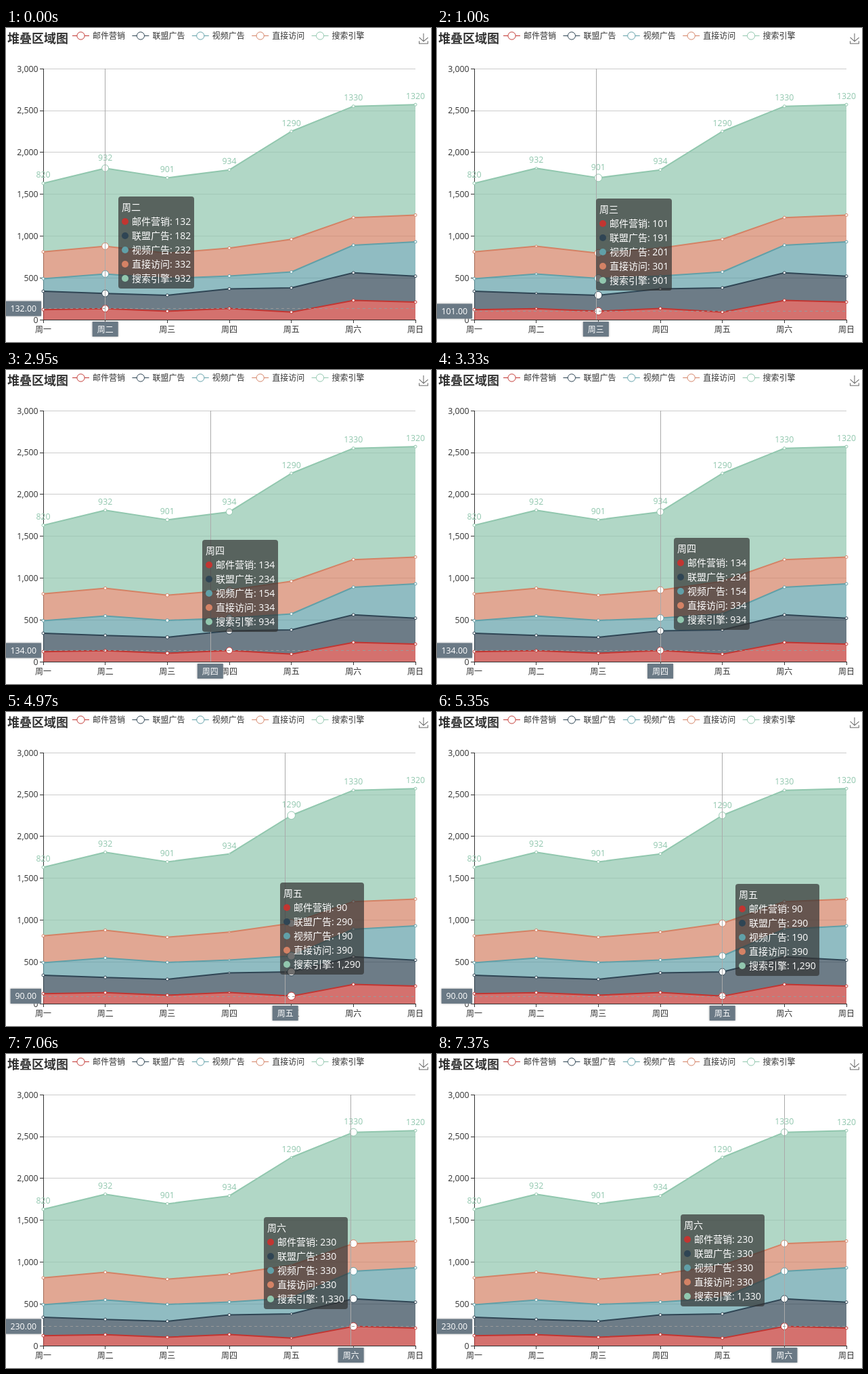
An HTML page that plays this animation: 628x464 px, repeating every 8000 ms.

```html
<!DOCTYPE html>
<html lang="zh-CN">
<head>
<meta charset="utf-8">
<title>堆叠区域图</title>
<style>
  html, body { margin: 0; width: 100%; height: 100%; overflow: hidden; background: #fff; }
  svg { display: block; width: 628px; height: 464px; }
  text { font: 12.3px 'Open Sans', 'Noto Sans CJK SC', 'Noto Sans CJK', sans-serif; fill: #333; white-space: pre; }
  .cjk { font-size: 12px; }
  .title { font-size: 18px; font-weight: bold; }
  .tip text { font-size: 14px; fill: #fff; }
  .tag text { fill: #fff; }
  .tag rect { fill: #6a7985; filter: drop-shadow(0 0 1.5px #aaa); }
</style>
</head>
<body>
<svg id="stage" viewBox="0 0 628 464"></svg>
<script>
const LOOP = 8000;
const LEFT = 55, RIGHT = 605, TOP = 60, BASE = 431;
const days = [...'一二三四五六日'].map(d => '周' + d);
const series = [
  ['邮件营销', '#c23531', [120, 132, 101, 134, 90, 230, 210]],
  ['联盟广告', '#2f4554', [220, 182, 191, 234, 290, 330, 310]],
  ['视频广告', '#61a0a8', [150, 232, 201, 154, 190, 330, 410]],
  ['直接访问', '#d48265', [320, 332, 301, 334, 390, 330, 320]],
  ['搜索引擎', '#91c7ae', [820, 932, 901, 934, 1290, 1330, 1320]]
].map(([name, color, data]) => ({ name, color, data }));

// Hovered day, tooltip corner, first and last redraw, redraw count, time already run
const stops = [
  { day: 1, x: 166, y: 249, from: -500, to: -30, steps: 7, lead: 16 },
  { day: 2, x: 258, y: 253, from: 920, to: 1390, steps: 7, lead: 16 },
  { day: 3, x: 350, y: 248, from: 2950, to: 3330, steps: 6, lead: 34 },
  { day: 4, x: 441, y: 254, from: 4970, to: 5350, steps: 6, lead: 67 },
  { day: 5, x: 360, y: 237, from: 6910, to: 7370, steps: 7, lead: 16 }
];

const stage = document.getElementById('stage');
const px = i => LEFT + (RIGHT - LEFT) * i / 6;
const py = v => BASE - (BASE - TOP) * v / 3000;
const snap = v => (Math.round(v * 2) | 1) / 2;
const mix = (a, b, t) => a + (b - a) * t;
const comma = n => n.toLocaleString('en-US');

function set(el, attrs) {
  for (const k in attrs) el.setAttribute(k, attrs[k]);
  return el;
}
function add(tag, attrs, parent = stage) {
  return parent.appendChild(set(document.createElementNS('http://www.w3.org/2000/svg', tag), attrs));
}
function line(x1, y1, x2, y2, stroke, more) {
  return add('line', { x1, y1, x2, y2, stroke, ...more });
}
function text(str, x, y, more, parent) {
  const el = add('text', { x, y, ...more }, parent);
  el.textContent = str;
  return el;
}

// Header
text('堆叠区域图', 2, 21.5, { class: 'title' });
series.forEach(({ name, color }, i) => {
  const x = 98 + 88.4 * i;
  line(x, 11.5, x + 25, 11.5, color);
  add('circle', { cx: x + 12.5, cy: 11.5, r: 5.6, fill: '#fff', stroke: color });
  text(name, x + 30, 16.3, { class: 'cjk' });
});
add('path', {
  d: 'M4.7 22.9 29.3 45.5 54.7 23.4M4.6 43.6V58H53.8V43.6M29.2 45.1V0',
  transform: 'translate(609.4 8) scale(.2586)', fill: 'none', stroke: '#666', 'stroke-width': 3.87
});

// Axes
for (let v = 0; v <= 3000; v += 500) {
  const y = snap(py(v));
  line(LEFT, y, RIGHT, y, '#ccc');
  line(LEFT - 5, y, LEFT, y, '#333');
  text(comma(v), 47.5, py(v) + 4.6, { 'text-anchor': 'end' });
}
line(LEFT + .5, TOP, LEFT + .5, BASE + 1, '#333');
line(LEFT, BASE + .5, RIGHT + 1, BASE + .5, '#333');
days.forEach((d, i) => {
  const x = snap(px(i));
  line(x, BASE, x, BASE + 5, '#333');
  text(d, px(i), 449.7, { 'text-anchor': 'middle', class: 'cjk' });
});

// Stacked series
let floor = days.map(() => 0);
for (const s of series) {
  s.low = floor;
  s.sum = floor = s.data.map((v, i) => v + s.low[i]);
}
const points = row => row.map((v, i) => [px(i), py(v)]);
for (const s of series)
  add('polygon', { points: [...points(s.sum), ...points(s.low).reverse()].join(' '), fill: s.color, 'fill-opacity': .7 });
for (const s of series)
  add('polyline', { points: points(s.sum).join(' '), fill: 'none', stroke: s.color, 'stroke-width': 2, 'stroke-linejoin': 'bevel' });
for (const s of series)
  s.dots = points(s.sum).map(([cx, cy]) => add('circle', { cx, cy, r: 2, fill: '#fff', stroke: s.color }));
const top5 = series[4];
const values = top5.data.map((v, i) =>
  text(v, px(i), 0, { 'text-anchor': 'middle', style: 'fill:' + top5.color }));

// Pointer
const cross = line(LEFT, 0, RIGHT, 0, '#999', { 'stroke-dasharray': '4 4' });
const rule = line(0, TOP, 0, BASE, '#aaa');
const xTag = add('g', { class: 'tag' });
add('rect', { x: -19, y: 434, width: 38, height: 22 }, xTag);
const xText = text('', 0, 449.7, { 'text-anchor': 'middle', class: 'cjk' }, xTag);
const yTag = add('g', { class: 'tag' });
const yBox = add('rect', { y: -11, height: 22 }, yTag);
const yText = text('', 45, 4.5, { 'text-anchor': 'end' }, yTag);

// Tooltip
const tip = add('g', { class: 'tip' });
const tipBox = add('rect', { height: 136, rx: 4, fill: '#323232', 'fill-opacity': .7 }, tip);
const tipHead = text('', 5, 20.7, {}, tip);
const tipRows = series.map((s, i) => {
  add('circle', { cx: 10, cy: 37 + 21 * i, r: 5, fill: s.color }, tip);
  return text('', 20, 41.7 + 21 * i, {}, tip);
});

const clamp = t => Math.min(1, Math.max(0, t));
const expoOut = t => t >= 1 ? 1 : 1 - 2 ** (-10 * t);
const elasticOut = t => t <= 0 ? 0 : t >= 1 ? 1 : 1 + 2 ** (-10 * t) * Math.sin((t - .1) * Math.PI * 5);
// cubic-bezier(.23, 1, .32, 1)
function quintOut(t) {
  if (t >= 1) return 1;
  let lo = 0, hi = 1;
  for (let i = 0; i < 24; i++) {
    const s = (lo + hi) / 2, r = 1 - s;
    if (.69 * s * r * r + .96 * s * s * r + s ** 3 < t) lo = s; else hi = s;
  }
  return 3 * lo * (1 - lo) + lo ** 3;
}

function draw(time) {
  let n = stops.length - 1;
  while (n && time < stops[n].from) n--;
  const now = stops[n], old = stops[Math.max(0, n - 1)];
  const gap = (now.to - now.from) / (now.steps - 1);
  const step = Math.min(now.steps - 1, Math.floor((time - now.from) / gap + .001));
  const ms = now.lead + step * gap;

  const x = mix(px(old.day), px(now.day), expoOut(clamp(ms / 200)));
  const grow = elasticOut(clamp(ms / 400));
  const move = quintOut(clamp(ms / 400));

  days.forEach((_, i) => {
    const r = 2 + 3 * (i === now.day ? grow : i === old.day ? 1 - grow : 0);
    for (const s of series) s.dots[i].setAttribute('r', r);
    values[i].setAttribute('y', py(top5.sum[i]) - r - 6.2);
  });

  const first = series[0].data[now.day], y = py(first);
  set(cross, { y1: snap(y), y2: snap(y) });
  set(rule, { x1: snap(x), x2: snap(x) });
  xTag.setAttribute('transform', `translate(${x} 0)`);
  xText.textContent = days[now.day];
  yTag.setAttribute('transform', `translate(0 ${y})`);
  yText.textContent = first.toFixed(2);
  const w = yText.getComputedTextLength() + 14;
  set(yBox, { x: 52 - w, width: w });

  tipHead.textContent = days[now.day];
  series.forEach((s, i) => { tipRows[i].textContent = `${s.name}: ${comma(s.data[now.day])}`; });
  tipBox.setAttribute('width', Math.round(25 + Math.max(...tipRows.map(r => r.getComputedTextLength()))));
  tip.setAttribute('transform',
    `translate(${Math.round(mix(old.x, now.x, move))} ${Math.round(mix(old.y, now.y, move))})`);
}

const start = performance.now();
function tick() {
  draw((performance.now() - start) % LOOP);
  requestAnimationFrame(tick);
}
tick();
</script>
</body>
</html>
```
